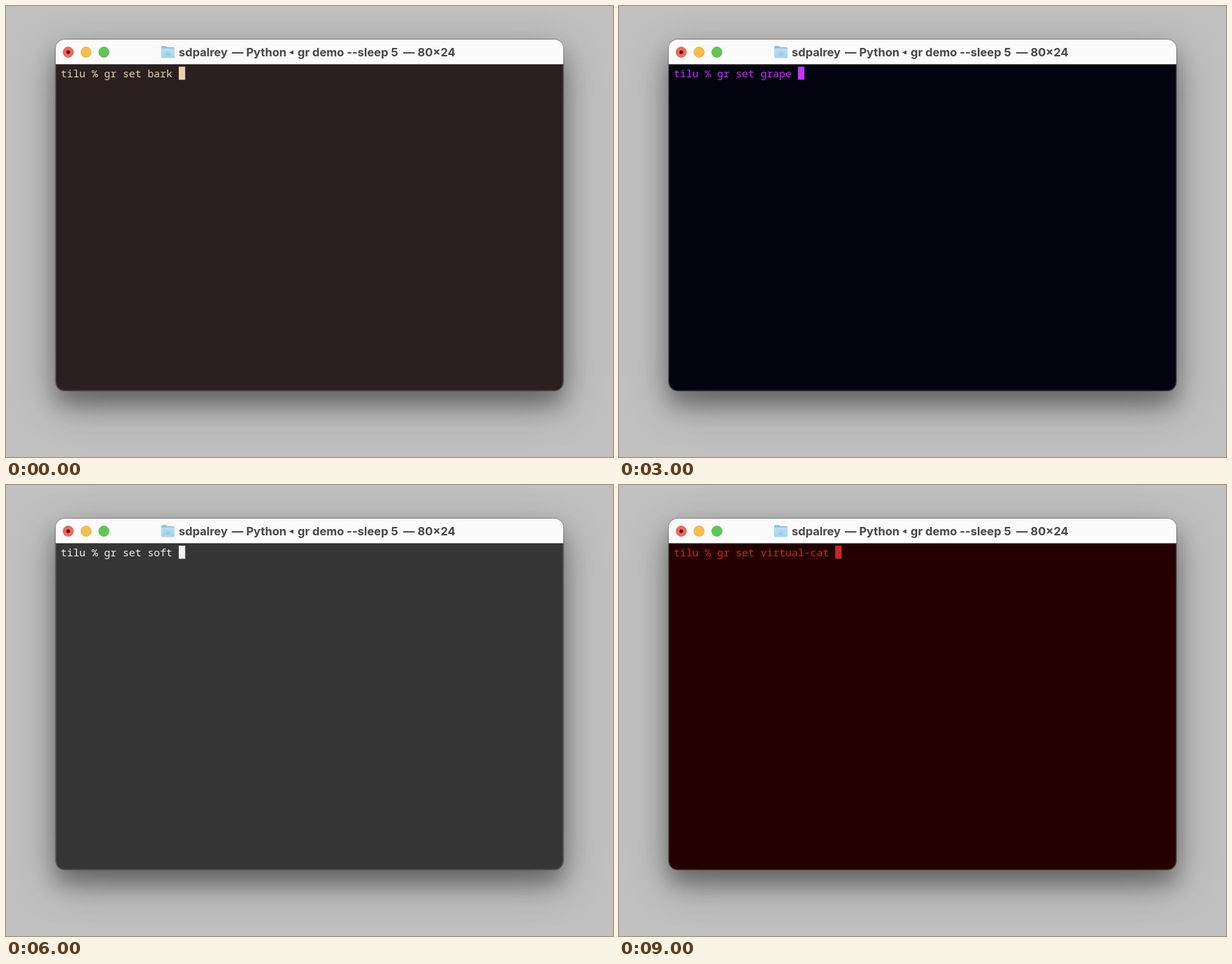
These frames come from a looping animation (868x645 px, 9.6 s). An HTML page:

```html
<!DOCTYPE html>
<html lang="en">
<head>
<meta charset="utf-8">
<title>Terminal themes</title>
<style>
html, body { margin: 0; width: 100%; height: 100%; overflow: hidden; background: #c0c0c0; }
.window {
  position: absolute; left: 71px; top: 48px; width: 726px; height: 502px;
  border-radius: 13px;
  box-shadow: 0 0 0 .7px rgba(0,0,0,.4), 0 20px 30px rgba(0,0,0,.3), 0 20px 62px rgba(0,0,0,.3);
}
svg { position: absolute; left: 0; top: 0; width: 868px; height: 645px; }
.title { font: 700 16.5px Inter, sans-serif; fill: #474747; }
.shell { font: 14.81px "Noto Sans Mono", monospace; white-space: pre; }
</style>
</head>
<body>
<div class="window"></div>
<svg viewBox="0 0 868 645">
  <defs>
    <clipPath id="frame"><rect x="71" y="48" width="726" height="502.5" rx="13"/></clipPath>
    <linearGradient id="blue" x2="0" y2="1">
      <stop stop-color="#b9def3"/><stop offset="1" stop-color="#a5d3ed"/>
    </linearGradient>
  </defs>
  <g clip-path="url(#frame)">
    <rect id="screen" x="71" y="83" width="726" height="468"/>
    <rect x="71" y="48" width="726" height="35.5" fill="#fbfbfb"/>
    <rect x="71" y="83.5" width="726" height="1" fill="#000" opacity=".5"/>
  </g>
  <path d="M71.5 84V537.5a12.5 12.5 0 0 0 12.5 12.5H784a12.5 12.5 0 0 0 12.5-12.5V84" fill="none" stroke="#fff" stroke-opacity=".17"/>
  <g stroke-width=".7">
    <circle cx="89" cy="66" r="7.4" fill="#ed6a5e" stroke="#d65246"/>
    <circle cx="114.5" cy="66" r="7.4" fill="#f5bf4f" stroke="#dda43a"/>
    <circle cx="140" cy="66" r="7.4" fill="#61c554" stroke="#4faa42"/>
    <circle cx="89" cy="66" r="2.6" fill="#5a0d08"/>
  </g>
  <path d="M222 59q0-1.7 1.7-1.7h5l2 1.7h8.600q1.700 0 1.700 1.700V72.500q0 1.700-1.700 1.700H223.700q-1.700 0-1.700-1.700Z" fill="#87bfdf"/>
  <rect x="222" y="60.600" width="19" height="13.400" rx="1.500" fill="url(#blue)"/>
  <path d="M228.300 67.500l3.200-3 3.200 3M229.300 67.500v2.800h1.400v-2h1.600v2h1.400v-2.800" fill="none" stroke="#8abfdd" stroke-width=".8"/>
  <g class="title">
    <text x="247" y="71.500">sdpalrey</text>
    <text x="323" y="71.500">— Python</text>
    <path d="M405 66.500l6-3v6Z"/>
    <text x="417" y="71.500">gr demo --sleep 5</text>
    <text x="568" y="71.500">— 80×24</text>
  </g>
  <text id="line" class="shell" x="78.200" y="102"></text>
  <rect id="cursor" y="86.800" width="9.200" height="18.700"/>
</svg>
<script>
const STEP = 600, COUNT = 16, CELL = 8.886;
// step, theme name, background, foreground
const themes = [
  [0, "bark", [42, 32, 32], [232, 209, 170]],
  [3, "default", [0, 0, 0], [255, 255, 255]],
  [5, "grape", [1, 3, 14], [200, 48, 255]],
  [8, "nicotine", [13, 15, 2], [236, 188, 96]],
  [10, "soft", [54, 54, 54], [240, 240, 240]],
  [12, "swamp-matcha", [29, 53, 20], [208, 223, 168]],
  [15, "virtual-cat", [37, 0, 0], [194, 44, 37]]
];
const byId = id => document.getElementById(id);
const screen_ = byId("screen"), line = byId("line"), cursor = byId("cursor");
const blend = (a, b, k) => `rgb(${a.map((v, i) => Math.round(v + (b[i] - v) * k))})`;

function show(step) {
  const i = themes.findLastIndex(t => t[0] <= step);
  const [from, name, back, ink] = themes[i];
  const next = themes[i + 1] || themes[i];
  const k = (step - from) / (next[0] - from || 1);
  const color = blend(ink, next[3], k);
  const text = `tilu % gr set ${name} `;
  screen_.setAttribute("fill", blend(back, next[2], k));
  line.textContent = text;
  line.setAttribute("fill", color);
  cursor.setAttribute("fill", color);
  cursor.setAttribute("x", 78.2 + text.length * CELL);
}

let start, shown = -1;
function tick(now) {
  start ??= now;
  const step = Math.floor((now - start) / STEP) % COUNT;
  if (step !== shown) show(shown = step);
  requestAnimationFrame(tick);
}
show(0);
requestAnimationFrame(tick);
</script>
</body>
</html>
```
